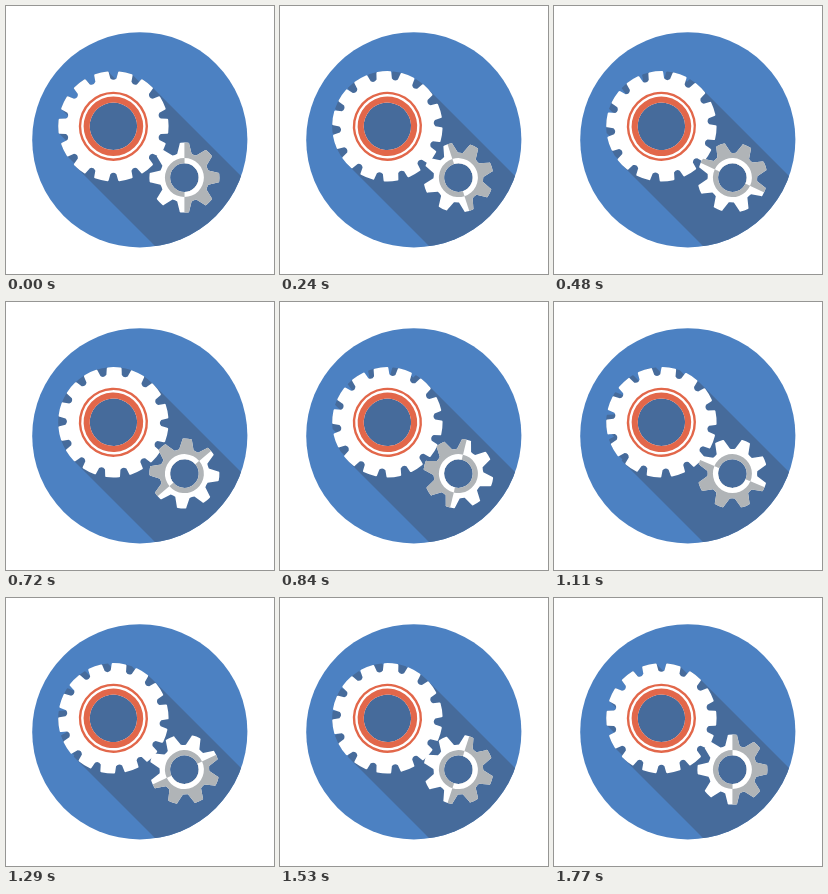
An HTML page with a canvas for the animation above (1.8 s loop, 268 by 268 pixels).

```html
<!DOCTYPE html>
<html lang="en">
<head>
<meta charset="utf-8">
<title>Turning gears</title>
<style>
html, body { margin: 0; width: 100%; height: 100%; overflow: hidden; background: #fff; }
canvas { display: block; width: 100vmin; height: 100vmin; }
</style>
</head>
<body>
<canvas id="stage" width="268" height="268"></canvas>
<script>
const SIZE = 268, LOOP = 1800, STEP = 30, TAU = Math.PI * 2;
const LAST = LOOP / STEP - 1;
const BLUE = '#4c81c2', SHADE = '#466b9b', WHITE = '#fff';
const ORANGE = '#e2674a', GRAY = '#b0b4b7';

const big = { x: 107.4, y: 120.3, teeth: 14, tip: 55.2, root: 48, floor: 45, tipHalf: 7.6, rootHalf: 7.7, phase: 0.5, hole: 23.7 };
const small = { x: 178.4, y: 171.6, teeth: 8, tip: 35, root: 25, floor: 24.5, tipHalf: 5, rootHalf: 7.2, phase: 0, hole: 14.3 };

const canvas = document.getElementById('stage');
const ctx = canvas.getContext('2d');

// Gear outline around 0,0 with a tooth at the top when phase is 0.
function outline(g) {
  const path = new Path2D();
  const pitch = TAU / g.teeth;
  const tipA = Math.asin(g.tipHalf / g.tip);
  const rootA = Math.asin(g.rootHalf / g.root);
  const round = 1.2, roundA = round / g.tip;
  const at = (r, a) => [r * Math.cos(a), r * Math.sin(a)];
  for (let i = 0; i < g.teeth; i++) {
    const a = (i + g.phase) * pitch - TAU / 4;
    path.lineTo(...at(g.root, a - rootA));
    path.lineTo(...at(g.tip - round, a - tipA));
    path.quadraticCurveTo(...at(g.tip, a - tipA), ...at(g.tip, a - tipA + roundA));
    path.arc(0, 0, g.tip, a - tipA + roundA, a + tipA - roundA);
    path.quadraticCurveTo(...at(g.tip, a + tipA), ...at(g.tip - round, a + tipA));
    path.lineTo(...at(g.root, a + rootA));
    path.quadraticCurveTo(...at(g.floor, a + pitch / 2), ...at(g.root, a + pitch - rootA));
  }
  path.closePath();
  return path;
}

function ringPath(outer, inner) {
  const path = new Path2D();
  path.arc(0, 0, outer, 0, TAU);
  path.moveTo(inner, 0);
  path.arc(0, 0, inner, 0, TAU);
  return path;
}

function withHole(g) {
  const path = new Path2D(outline(g));
  path.moveTo(g.hole, 0);
  path.arc(0, 0, g.hole, 0, TAU);
  return path;
}

function fill(path, color) {
  ctx.fillStyle = color;
  ctx.fill(path, 'evenodd');
}

function turned(g, angle, draw) {
  ctx.save();
  ctx.translate(g.x, g.y);
  ctx.rotate(angle);
  draw();
  ctx.restore();
}

function half(x, draw) {
  ctx.save();
  ctx.beginPath();
  ctx.rect(x, -60, 60, 120);
  ctx.clip();
  draw();
  ctx.restore();
}

const disc = new Path2D();
disc.arc(133.8, 133.8, 107.6, 0, TAU);

// The long shadow stays still: both resting outlines swept down and right.
const shadow = new Path2D();
for (const g of [big, small]) {
  const path = outline(g);
  for (let d = 0; d < 170; d++) {
    shadow.addPath(path, new DOMMatrix().translate(g.x + d, g.y + d));
  }
}

const bigBody = withHole(big), smallBody = withHole(small);
const thickRing = ringPath(29.8, big.hole);
const thinRing = ringPath(34.6, 32.2);
const smallRing = ringPath(19.5, small.hole);

function drawBig(angle) {
  turned(big, angle, () => {
    fill(bigBody, WHITE);
    fill(thickRing, ORANGE);
    fill(thinRing, ORANGE);
  });
}

function drawSmall(angle) {
  turned(small, angle, () => {
    fill(smallBody, WHITE);
    half(0, () => {
      fill(smallBody, GRAY);
      fill(smallRing, WHITE);
    });
    half(-60, () => fill(smallRing, GRAY));
  });
}

const ease = u => u * u * (3 - 2 * u);

function render(time) {
  const turn = ease(Math.floor((time % LOOP) / STEP) / LAST) * TAU;
  const scale = canvas.width / SIZE;
  ctx.setTransform(scale, 0, 0, scale, 0, 0);
  ctx.fillStyle = WHITE;
  ctx.fillRect(0, 0, SIZE, SIZE);
  fill(disc, BLUE);
  ctx.save();
  ctx.clip(disc);
  ctx.fillStyle = SHADE;
  ctx.fill(shadow);
  ctx.restore();
  drawBig(turn / 2);
  drawSmall(-turn);
}

function resize() {
  const side = Math.min(innerWidth, innerHeight) || SIZE;
  canvas.width = canvas.height = Math.round(side * (devicePixelRatio || 1));
}

resize();
addEventListener('resize', resize);
const start = performance.now();
function tick() {
  render(performance.now() - start);
  requestAnimationFrame(tick);
}
tick();
</script>
</body>
</html>
```
